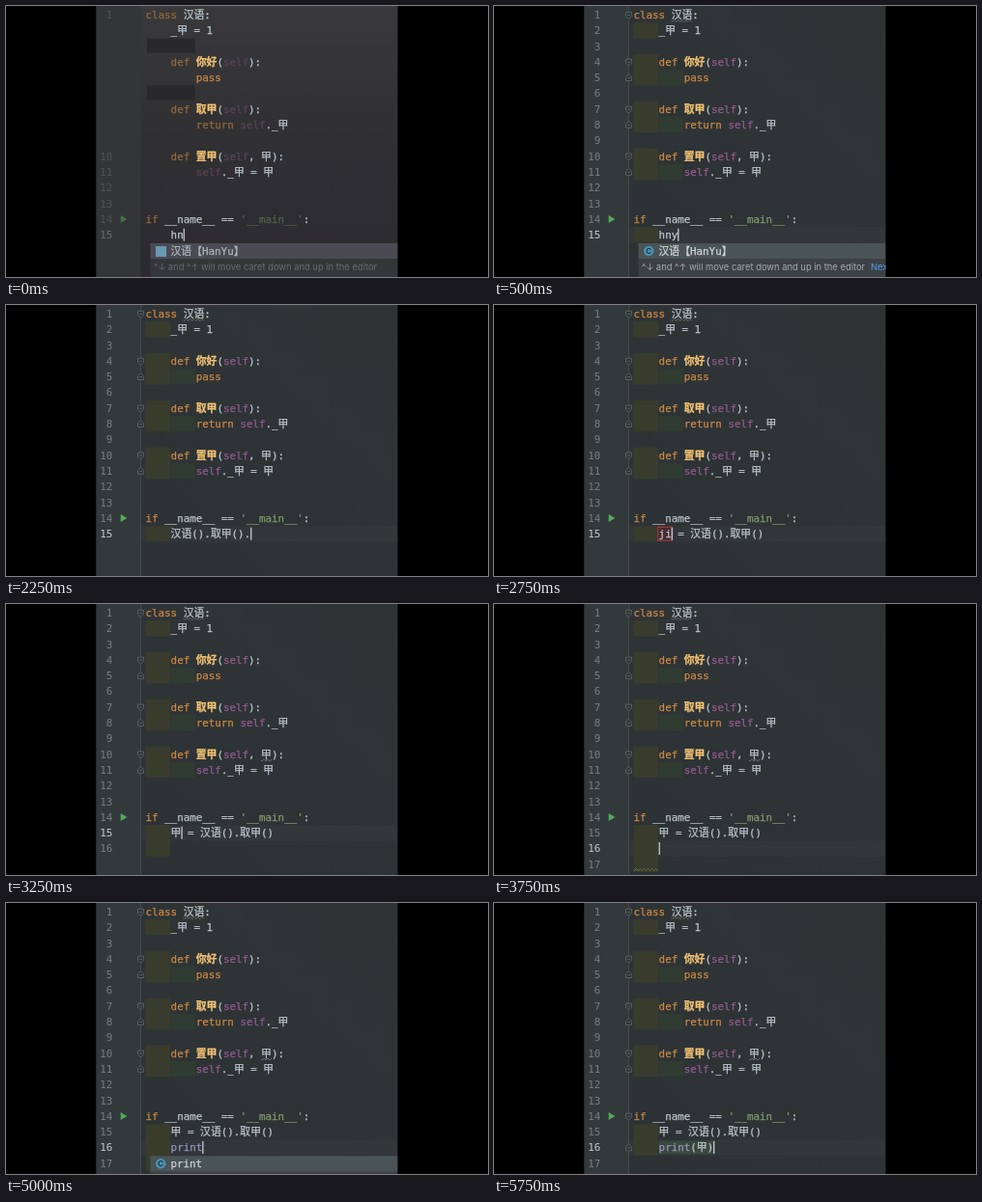
An HTML page with a canvas for the animation above (6000 ms loop, 499 by 281 pixels).

```html
<!DOCTYPE html>
<html lang="zh">
<head>
<meta charset="utf-8">
<style>
  html, body { margin: 0; width: 100%; height: 100%; overflow: hidden; background: #000; }
  canvas { display: block; }
</style>
</head>
<body>
<canvas id="stage" width="499" height="281"></canvas>
<script>
const ctx = document.getElementById('stage').getContext('2d');
const MONO = '"DejaVu Sans Mono", "Noto Sans CJK SC", "Noto Sans CJK", monospace';
const SIZE = 10.85, PITCH = 16.3, LEFT = 144.5, INDENT = 26.1, LOOP = 6000;

const CODE = {
  1: 'class 汉语:', 2: '    _甲 = 1',
  4: '    def 你好(self):', 5: '        pass',
  7: '    def 取甲(self):', 8: '        return self._甲',
  10: '    def 置甲(self, 甲):', 11: '        self._甲 = 甲',
  14: "if __name__ == '__main__':"
};
const CALL = '甲 = 汉语().取甲()';

// Each step holds until the next one; caret counts characters before the bar.
const STEPS = [
  { at: 0, text: 'hn', caret: 2, popup: '汉语【HanYu】', rough: true },
  { at: 250, text: 'hny', caret: 3, popup: '汉语【HanYu】' },
  { at: 750, text: '汉语()', caret: 4 },
  { at: 1250, text: '汉语()' },
  { at: 1500, text: '汉语().' },
  { at: 1750, text: '汉语().qj', caret: 7 },
  { at: 2000, text: '汉语().取甲()', caret: 9 },
  { at: 2250, text: '汉语().取甲().', caret: 10 },
  { at: 2500, text: 'j = 汉语().取甲()', caret: 1, rename: 1 },
  { at: 2750, text: 'ji = 汉语().取甲()', caret: 2, rename: 2 },
  { at: 3000, text: 'jia = 汉语().取甲()', caret: 3, rename: 3, popup: '甲【Jia】' },
  { at: 3250, text: CALL, caret: 1, last: 16 },
  { at: 3500, text: CALL, caret: 11, last: 16 },
  { at: 3750, next: '', caret: 0 },
  { at: 4000, next: '' },
  { at: 4250, next: '', caret: 0 },
  { at: 4750, next: 'pr', caret: 2, popup: 'print' },
  { at: 5000, next: 'print', caret: 5, popup: 'print' },
  { at: 5250, next: 'print()', caret: 6 },
  { at: 5500, next: 'print(j)', caret: 7 },
  { at: 5750, next: 'print(甲)', caret: 8, boxed: true }
];

const center = n => 9 + (n - 1) * PITCH;

function rect(x, y, w, h, color) {
  ctx.fillStyle = color;
  ctx.fillRect(x, y, w, h);
}

function setMono(bold) {
  ctx.font = `${bold ? 700 : 500} ${SIZE}px ${MONO}`;
}

function textWidth(text) {
  setMono(false);
  return ctx.measureText(text).width;
}

function label(text, x, y, color, font, align = 'left') {
  ctx.font = font;
  ctx.textAlign = align;
  ctx.fillStyle = color;
  ctx.fillText(text, x, y);
  ctx.textAlign = 'left';
}

// A hairline outline gives the medium weight between regular and bold.
function mediumText(text, x, y, color) {
  ctx.fillStyle = ctx.strokeStyle = color;
  ctx.lineWidth = .25;
  ctx.fillText(text, x, y);
  ctx.strokeText(text, x, y);
}

function tokenColor(token, rough) {
  if (/^(class|def|return|if)$/.test(token)) return rough ? '#93683c' : '#cc8742';
  if (token === 'pass') return '#cc8742';
  if (token === 'self') return rough ? '#584454' : '#93598f';
  if (token[0] === "'") return rough ? '#55604b' : '#83996c';
  if (token === 'print') return '#9297bd';
  return '#bcc5cd';
}

function codeLine(text, n, rough) {
  const tokens = text.match(/'[^']*'|[a-zA-Z]+|_+[a-z]+_+|\s+|[\u4e00-\u9fff]+|[^\sa-zA-Z\u4e00-\u9fff']/g) || [];
  let x = LEFT;
  tokens.forEach((token, i) => {
    const isName = tokens[i - 2] === 'def';
    setMono(isName);
    mediumText(token, x, center(n) + 3.9, isName ? '#f3c273' : tokenColor(token, rough));
    x += ctx.measureText(token).width;
  });
}

function wave(x, y, width, color) {
  ctx.beginPath();
  for (let i = 0; i <= width; i++) ctx.lineTo(x + i, y + Math.sin(i * Math.PI / 2));
  ctx.strokeStyle = color;
  ctx.lineWidth = .7;
  ctx.stroke();
}

function foldMark(n, opens) {
  const y = center(n) + .3, d = opens ? 1 : -1;
  ctx.beginPath();
  [[-3, -3], [3, -3], [3, 1], [0, 4], [-3, 1]].forEach(([dx, dy]) => ctx.lineTo(139.5 + dx, y + dy * d));
  ctx.closePath();
  ctx.fillStyle = '#2f3537';
  ctx.fill();
  ctx.strokeStyle = '#626a6b';
  ctx.lineWidth = .8;
  ctx.stroke();
  rect(138, y - .4, 3, .8, '#626a6b');
}

function indentBlocks(step, last) {
  if (step.rough) return;
  const olive = '#393b2d', green = '#303b32';
  const block = (col, from, to, color) =>
    rect(LEFT + col * INDENT, center(from) - 8.1, INDENT - .6, (to - from + 1) * PITCH, color);
  block(0, 2, 2, olive);
  for (const n of [4, 7, 10]) {
    block(0, n, n + 1, olive);
    block(1, n + 1, n + 1, green);
  }
  block(0, 15, last === 17 && !step.boxed ? 17 : Math.min(last, 16), olive);
}

function gutter(step, current, last) {
  ctx.globalAlpha = step.rough ? .4 : 1;
  for (let n = 1; n <= last; n++) {
    if (step.rough && n > 1 && n < 10) continue;
    setMono(false);
    label(n, 110.3, center(n) + 3.9, n === current ? '#c4c9cc' : '#777f82', ctx.font, 'right');
  }
  if (!step.rough) {
    rect(139.2, 0, .8, 281, '#4a5051');
    [1, 4, 7, 10].forEach(n => foldMark(n, true));
    [5, 8, 11].forEach(n => foldMark(n, false));
    if (step.boxed) { foldMark(14, true); foldMark(16, false); }
  }
  ctx.globalAlpha = step.rough ? .5 : 1;
  ctx.beginPath();
  ctx.moveTo(118.7, 217);
  ctx.lineTo(125.3, 221);
  ctx.lineTo(118.7, 225);
  ctx.fillStyle = '#55a95a';
  ctx.fill();
  ctx.globalAlpha = 1;
}

function popup(title, line, rough) {
  const y = center(line) + 8.8;
  rect(149.5, y, 256, 16.5, rough ? '#4b4a52' : '#4a5356');
  rect(149.5, y + 16.5, 256, 19, rough ? '#35363a' : '#3b4144');
  ctx.beginPath();
  if (rough) ctx.rect(155, y + 3, 11, 11);
  else ctx.arc(160.3, y + 8, 5.3, 0, 7);
  ctx.fillStyle = rough ? '#6998b4' : '#4a8fb0';
  ctx.fill();
  if (!rough) label('C', 160.3, y + 11, '#25343b', '600 8px Inter, sans-serif', 'center');
  setMono(false);
  mediumText(title, 170.5, y + 11.8, rough ? '#a9b5bc' : '#d0d5d8');
  const hint = '9.4px Inter, sans-serif', hintY = y + 28.2;
  ctx.globalAlpha = rough ? .45 : 1;
  label('^↓ and ^↑ will move caret down and up in the editor', 153, hintY, '#a3abae', hint);
  if (!rough) label('Next Tip', 390, hintY, '#589df0', hint);
  ctx.globalAlpha = 1;
}

function background(rough) {
  const shade = rough ? ctx.createLinearGradient(0, 0, 0, 281) : ctx.createLinearGradient(140, 281, 405, 0);
  const colors = rough ? ['#39393b', '#303033', '#2c2a2f'] : ['#2b3135', '#2e3436', '#303334'];
  colors.forEach((color, i) => shade.addColorStop(i / 2, color));
  rect(0, 0, 499, 281, '#000');
  rect(93.5, 0, 312, 281, shade);
  rect(93.5, 0, 46, 281, rough ? '#343536' : '#32393b');
  if (rough) [3, 6].forEach(n => rect(146, center(n) - 8, 50, 15, '#29292b'));
}

function draw(time) {
  const step = STEPS.findLast(s => s.at <= time);
  const typingNext = step.next !== undefined;
  const current = typingNext ? 16 : 15;
  const last = typingNext ? 17 : step.last || 15;
  const start = LEFT + INDENT;
  const typed = typingNext ? step.next : step.text;

  ctx.save();
  background(step.rough);
  ctx.beginPath();
  ctx.rect(93.5, 0, 312, 281);
  ctx.clip();
  if (step.rough) ctx.filter = 'blur(0.7px)';
  else rect(140, center(current) - 8, 266, PITCH, 'rgba(255,255,255,.018)');
  indentBlocks(step, last);
  gutter(step, current, last);

  if (step.boxed) rect(start, center(16) - 7, textWidth(typed), 14, '#3b4840');
  if (step.rename) {
    const w = textWidth(typed.slice(0, step.rename)) + 2;
    rect(start - 1, center(15) - 7, w, 14, '#482c30');
    ctx.strokeStyle = '#a83b40';
    ctx.lineWidth = 1;
    ctx.strokeRect(start - 1, center(15) - 7, w, 14);
  }

  for (const n in CODE) codeLine(CODE[n], +n, step.rough);
  codeLine('    ' + (typingNext ? CALL : step.text), 15, step.rough);
  if (step.next) codeLine('    ' + step.next, 16);

  if (!step.rough) wave(LEFT + textWidth('class '), 15.5, 21, '#858b85');
  if (last > 15) wave(LEFT + textWidth('    def 置甲(self, '), 162, 11, '#858b85');
  if (time >= 750 && time < 2000) wave(start, 244, 35, '#777d79');
  if (typingNext && !step.next) wave(LEFT, 275.5, 25, '#8e8b4c');
  if (step.caret !== undefined) {
    rect(start + textWidth(typed.slice(0, step.caret)), center(current) - 6.5, 1.2, 13, '#d3d7d9');
  }
  if (step.popup) popup(step.popup, current, step.rough);
  ctx.restore();
}

function tick() {
  draw(performance.now() % LOOP);
  requestAnimationFrame(tick);
}
tick();
</script>
</body>
</html>
```
